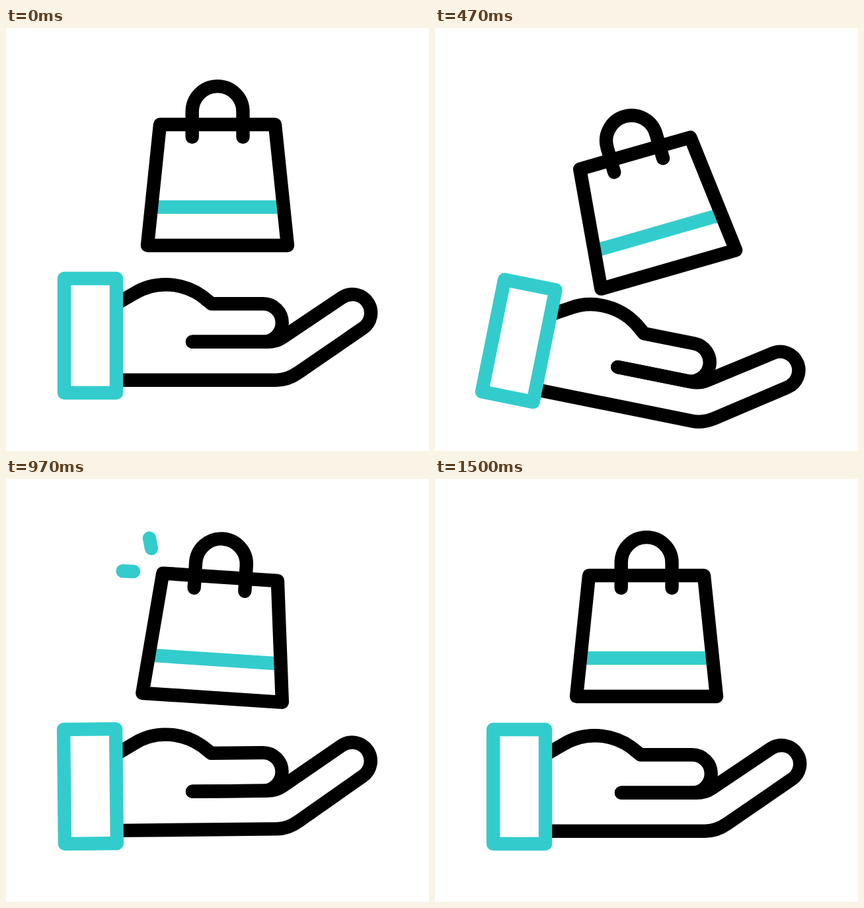
An HTML page for the animation above (2000 ms loop, 640 by 640 pixels).

```html
<!DOCTYPE html>
<html lang="en">
<head>
<meta charset="utf-8">
<title>Shopping bag over hand</title>
<style>
  html, body { margin: 0; width: 100%; height: 100%; overflow: hidden; background: #fff; }
  svg { display: block; width: 100%; height: 100%; }
  .ink, .teal { fill: none; stroke-width: 20.4; stroke-linecap: round; stroke-linejoin: round; }
  .ink { stroke: #000; }
  .teal { stroke: #33cccc; }
</style>
</head>
<body>
<svg viewBox="0 0 640 640">
  <g id="hand">
    <path class="ink" d="M170 415.5 L195 401 C209 392.5 225 388.2 241 388.2 C262 388.2 281 394.5 297 406 L311 417.2
      H389 A28.8 28.8 0 0 1 389 474.8 H282"/>
    <path class="ink" d="M282 474.8 H396 C404 474.8 412 472.5 418 468.5 L508.4 407.8
      A28 28 0 0 1 539.8 454.3 L442 521.5 C432 528.5 421 532.7 409 532.7 H170"/>
    <path class="teal" d="M88 379 H167 V552 H88 Z"/>
  </g>
  <g id="bag">
    <path class="teal" d="M221 271 H419"/>
    <path class="ink" d="M233 146 H407 L426 329 H214 Z"/>
    <path class="ink" d="M281.7 165 V126.5 A38.4 38.4 0 0 1 358.5 126.5 V165"/>
  </g>
  <line id="sparkUp" class="teal"/>
  <line id="sparkSide" class="teal"/>
</svg>
<script>
  const LOOP = 2000, FPS = 30, LAST = 45;
  const $ = id => document.getElementById(id);

  // Keys are [step, value] pairs, eased in and out between neighbours.
  const handTurn = [[3, 0], [13, 11.85], [23, -5], [33, 1.8], [43, 0]];
  const bagTurn = [[0, 0], [13, -16.5], [25, 8.5], [35, -5], [45, 0]];
  const bagDrop = [[0, 0], [15.2, 41.8], [27, 0], [36, 17], [45, 0]];
  const sparkHead = [[26.3, 0], [35.7, 1]];
  const sparkTail = [[32, 0], [43, 1]];

  function valueAt(keys, n) {
    if (n <= keys[0][0]) return keys[0][1];
    for (let i = 1; i < keys.length; i++) {
      const [n0, v0] = keys[i - 1], [n1, v1] = keys[i];
      if (n < n1) {
        const x = (n - n0) / (n1 - n0);
        return v0 + (v1 - v0) * x * x * (3 - 2 * x);
      }
    }
    return keys[keys.length - 1][1];
  }

  function drawSpark(id, x0, y0, x1, y1, tail, head) {
    const el = $(id);
    el.style.display = head - tail > 0.001 ? "" : "none";
    el.setAttribute("x1", x0 + (x1 - x0) * tail);
    el.setAttribute("y1", y0 + (y1 - y0) * tail);
    el.setAttribute("x2", x0 + (x1 - x0) * head);
    el.setAttribute("y2", y0 + (y1 - y0) * head);
  }

  function draw(n) {
    $("hand").setAttribute("transform", `rotate(${valueAt(handTurn, n)} 88 465.5)`);
    $("bag").setAttribute("transform",
      `translate(0 ${valueAt(bagDrop, n)}) rotate(${valueAt(bagTurn, n)} 320 208.5)`);
    const tail = valueAt(sparkTail, n), head = valueAt(sparkHead, n);
    drawSpark("sparkUp", 220, 105, 204.5, 28, tail, head);
    drawSpark("sparkSide", 193, 140, 111, 136.3, tail, head);
  }

  const start = performance.now();
  function tick() {
    const t = (performance.now() - start) % LOOP;
    // The small lead puts each step on the nearest 10 ms.
    draw(Math.min(LAST, Math.floor((t + 4) * FPS / 1000)));
    requestAnimationFrame(tick);
  }
  draw(0);
  requestAnimationFrame(tick);
</script>
</body>
</html>
```
